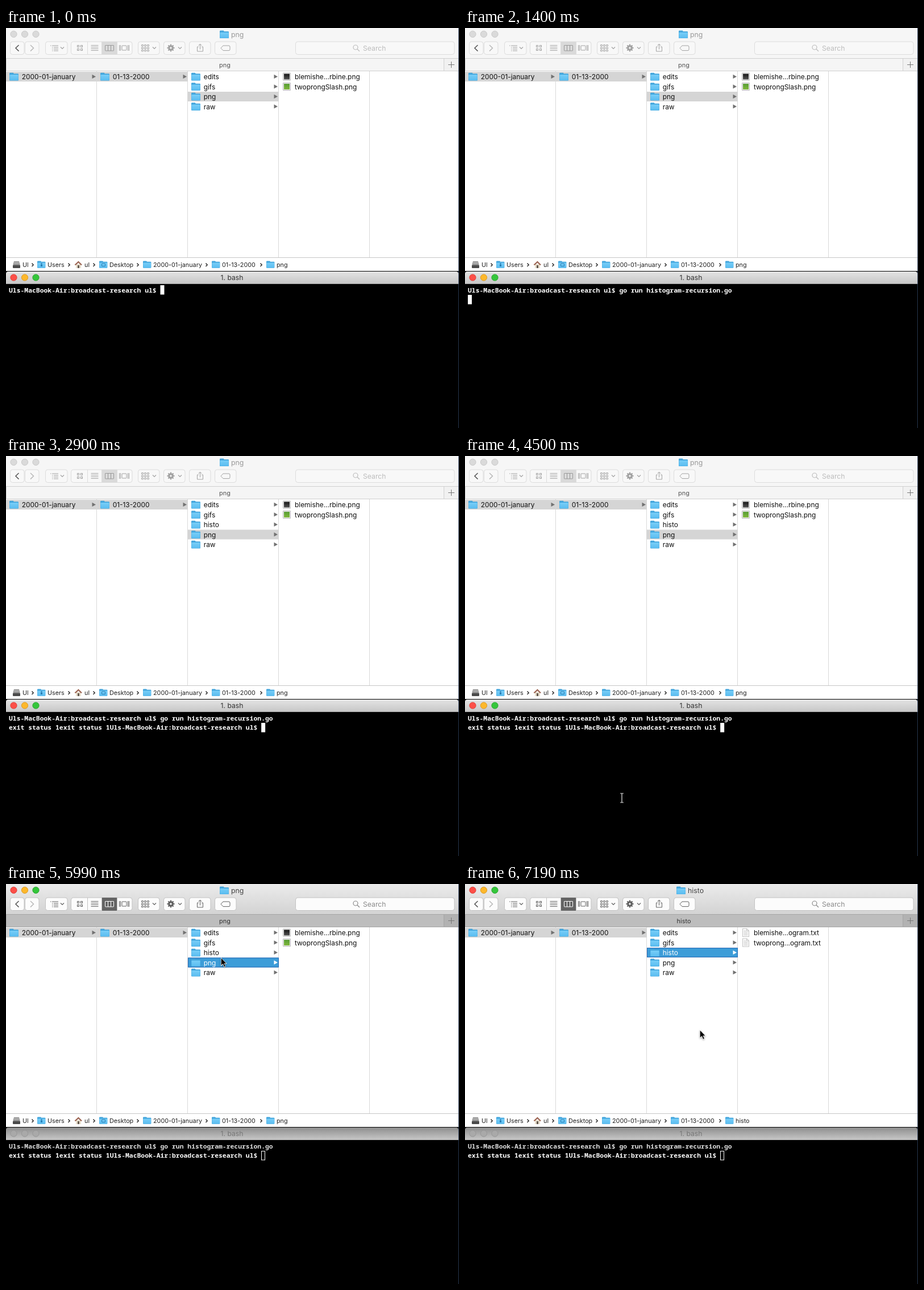
Write an HTML page with a canvas that moves like this. It is 797 by 703 pixels and loops after 7290 ms.

```html
<!DOCTYPE html>
<html lang="en">
<head>
<meta charset="utf-8">
<title>Terminal and file browser</title>
<style>
  html, body { margin: 0; width: 100%; height: 100%; overflow: hidden; background: #000; }
  canvas { display: block; }
</style>
</head>
<body>
<canvas id="stage" width="797" height="703"></canvas>
<script>
const ctx = document.getElementById('stage').getContext('2d');
const LOOP = 7290, ROW = 17.5, CELL = 6.833;
const PROMPT = 'Uls-MacBook-Air:broadcast-research ul$ ';
const COMMAND = 'go run histogram-recursion.go ';
const OUTPUT = 'exit status 1'.repeat(2) + PROMPT;

// Pointer stops: time, x, y
const POINTER = [
  [4500, 276, 601], [4600, 275, 500], [4700, 276, 380], [4790, 279, 307],
  [5090, 325, 254], [5190, 374, 199], [5290, 397, 168], [5390, 396, 140],
  [5490, 391, 112], [5590, 386, 94], [5690, 382, 104], [5790, 379, 119],
  [5990, 378, 129], [6090, 377, 125], [6190, 376, 120], [6290, 375, 115],
  [6390, 375, 113], [6890, 378, 130], [6990, 390, 182], [7090, 406, 235],
  [7190, 413, 256]
];

function box(x, y, w, h, fill) {
  ctx.fillStyle = fill;
  ctx.fillRect(x, y, w, h);
}

function round(x, y, w, h, r, fill, stroke) {
  ctx.beginPath();
  ctx.roundRect(x, y, w, h, r);
  if (fill) { ctx.fillStyle = fill; ctx.fill(); }
  if (stroke) { ctx.strokeStyle = stroke; ctx.lineWidth = 1; ctx.stroke(); }
}

function disc(x, y, r, fill, stroke) {
  ctx.beginPath();
  ctx.arc(x, y, r, 0, Math.PI * 2);
  if (fill) { ctx.fillStyle = fill; ctx.fill(); }
  if (stroke) { ctx.strokeStyle = stroke; ctx.stroke(); }
}

function line(points, color, width = 1) {
  ctx.beginPath();
  points.forEach(([x, y]) => ctx.lineTo(x, y));
  ctx.strokeStyle = color;
  ctx.lineWidth = width;
  ctx.stroke();
}

function shape(points, fill) {
  ctx.beginPath();
  points.forEach(([x, y]) => ctx.lineTo(x, y));
  ctx.closePath();
  ctx.fillStyle = fill;
  ctx.fill();
}

function fade(y0, y1, top, bottom) {
  const g = ctx.createLinearGradient(0, y0, 0, y1);
  g.addColorStop(0, top);
  g.addColorStop(1, bottom);
  return g;
}

function label(text, x, y, size = 11.9, color = '#111', align = 'left') {
  ctx.font = `${size}px Inter, sans-serif`;
  ctx.textAlign = align;
  ctx.fillStyle = color;
  ctx.fillText(text, x, y);
}

function folder(x, y, s = 1) {
  ctx.save();
  ctx.translate(x, y);
  ctx.scale(s, s);
  round(0, 0, 7.5, 6, 1.2, '#42a5dc');
  round(0, 1.4, 16, 12.2, 1.2, '#42a5dc');
  round(0.4, 3.2, 15.2, 10, 0.8, fade(3, 13, '#78cef8', '#5bbdf0'));
  ctx.restore();
}

function lights(y, active) {
  const colors = [['#fc4f48', '#df3c36'], ['#fdb82c', '#dc9a22'], ['#35c63b', '#27a52d']];
  const idle = y > 400 ? ['#a9a9a9', '#979797'] : ['#dadada', '#c9c9c9'];
  ctx.lineWidth = 1;
  [13.5, 33, 52.5].forEach((x, i) => disc(x, y, 5.6, ...(active ? colors[i] : idle)));
}

const chevron = (x, y, color) => line([[x - 3, y - 1.5], [x, y + 1.5], [x + 3, y - 1.5]], color, 1.2);

function toolbar(active) {
  const ink = active ? '#606060' : '#a2a2a2';
  const edge = active ? '#c2c2c2' : '#dcdcdc';
  const fill = active ? '#fcfcfc' : '#f8f8f8';
  [[7, 25], [33, 25], [69, 39], [114, 108], [232, 38], [277, 38], [322, 38], [367, 38], [509, 280]]
    .forEach(([x, w]) => round(x + .5, 24, w - .5, 22.5, 4, fill, edge));

  line([[22.5, 30], [17, 35.3], [22.5, 40.6]], '#555', 1.5);
  line([[43, 30], [48.5, 35.3], [43, 40.6]], '#b8b8b8', 1.5);

  [30.5, 33.5, 36.5, 39.5].forEach((y, i) => {
    const inset = i ? 3 : 0;
    box(78 + inset, y, 1.5, 1, ink);
    box(81 + inset, y, 11 - inset, 1, ink);
  });
  [99, 261, 306].forEach(x => chevron(x, 35, ink));

  box(169, 24, 26, 23, active ? '#646464' : '#dadada');
  [143, 168, 195].forEach(x => box(x, 24, 1, 23, edge));
  for (const x of [125, 131]) for (const y of [30.5, 36.5]) {
    ctx.strokeStyle = ink;
    ctx.lineWidth = 1;
    ctx.strokeRect(x + .5, y, 3, 3);
  }
  [30, 33, 36, 39].forEach(y => box(149.5, y, 13, 1, ink));
  const chosen = active ? '#fff' : '#999';
  round(174.5, 30.5, 15, 9.5, .5, null, chosen);
  [179.5, 184.5].forEach(x => line([[x, 30], [x, 40]], chosen));
  [199.5, 201.5, 214.5, 216.5].forEach(x => line([[x, 30], [x, 40]], ink));
  round(204, 31, 8, 8, .5, null, ink);

  for (let i = 0; i < 9; i++) {
    round(238.5 + i % 3 * 5, 29.5 + Math.floor(i / 3) * 4.5, 3, 2.5, .4, null, ink);
  }

  for (let i = 0; i < 8; i++) {
    const a = i * Math.PI / 4, c = Math.cos(a), s = Math.sin(a);
    line([[290 + c * 3, 35 + s * 3], [290 + c * 6.5, 35 + s * 6.5]], ink, 2.2);
  }
  disc(290, 35, 4.8, ink);
  disc(290, 35, 1.7, fill);

  line([[339, 33], [336.5, 33], [336.5, 41], [346.5, 41], [346.5, 33], [344, 33]], ink);
  line([[341.5, 37.5], [341.5, 28.5]], ink);
  line([[338.5, 31], [341.5, 28], [344.5, 31]], ink);

  ctx.beginPath();
  ctx.moveTo(378, 35.3);
  ctx.lineTo(382, 31);
  ctx.lineTo(392, 31);
  ctx.quadraticCurveTo(394, 31, 394, 33);
  ctx.lineTo(394, 37.6);
  ctx.quadraticCurveTo(394, 39.6, 392, 39.6);
  ctx.lineTo(382, 39.6);
  ctx.closePath();
  ctx.strokeStyle = ink;
  ctx.stroke();

  const hint = active ? '#8a8a8a' : '#bdbdbd';
  ctx.lineWidth = 1.2;
  disc(615, 34, 4, null, hint);
  line([[618, 37], [622, 41]], hint, 1.3);
  label('Search', 628, 39.8, 12.2, hint);
}

function row(x, y, name, state) {
  const blue = state === 'blue';
  if (state) box(x, y, x ? 160 : 159, 17, blue ? '#3c9cd8' : '#d5d5d5');
  if (blue) round(x + .5, y + .5, 159, 16, 0, null, '#2868b4');
  folder(x + 6, y + 1.8);
  label(name, x + 27.7, y + 13, 11.9, blue ? '#fff' : '#111');
  shape([[x + 151.5, y + 4.8], [x + 158, y + 8.4], [x + 151.5, y + 12]], blue ? '#fff' : '#727272');
}

function picture(y, green) {
  round(487.5, y + 2, 13, 13, .5, '#f4f4f4', '#b5b5b5');
  box(489, y + 3.5, 10, 10, green ? fade(y + 3, y + 14, '#559b35', '#82b83c') : fade(y + 3, y + 14, '#151515', '#555'));
}

function paper(y) {
  shape([[488, y + 1], [496, y + 1], [500, y + 5], [500, y + 16], [488, y + 16]], '#c4c4c4');
  shape([[489, y + 2], [495.5, y + 2], [499, y + 5.5], [499, y + 15], [489, y + 15]], '#fafafa');
  line([[495.5, y + 1.5], [495.5, y + 5.5], [499.5, y + 5.5]], '#c4c4c4');
  for (let i = 0; i < 4; i++) box(490.5, y + 5 + i * 2.4, i ? 7 : 4, 1, '#c9c9c9');
}

function columns(t, active, selected) {
  box(0, 76, 796, 328, '#fff');
  [159, 319, 479, 639].forEach(x => box(x, 76, 1, 328, '#d9d9d9'));
  row(0, 77, '2000-01-january', 'grey');
  row(160, 77, '01-13-2000', 'grey');

  const step = Math.floor((t - 1900) / 100) / 4;
  const gap = ROW * Math.max(0, Math.min(1, step)) ** 2;
  const state = name => name === selected ? (active ? 'blue' : 'grey') : '';
  row(320, 77, 'edits', '');
  row(320, 77 + ROW, 'gifs', '');
  if (gap) {
    ctx.save();
    ctx.beginPath();
    ctx.rect(320, 111, 160, gap + 1);
    ctx.clip();
    row(320, 77 + 2 * ROW, 'histo', state('histo'));
    ctx.restore();
  }
  row(320, 77 + 2 * ROW + gap, 'png', state('png'));
  row(320, 77 + 3 * ROW + gap, 'raw', '');

  const text = selected === 'histo';
  const files = text ? ['blemishe...ogram.txt', 'twoprong...ogram.txt'] : ['blemishe...rbine.png', 'twoprongSlash.png'];
  files.forEach((name, i) => {
    const y = 77 + i * ROW;
    text ? paper(y) : picture(y, i === 1);
    label(name, 508, y + 13);
  });
}

function pathBar(selected) {
  box(0, 403, 796, 1, '#c6c6c6');
  box(0, 404, 796, 23, '#fff');
  shape([[14, 410], [23, 410], [25, 418], [12, 418]], '#8b8b8b');
  round(12, 417, 13, 5, 1, '#4b4b4b');
  box(14, 411, 9, 4, '#aaa');

  [55, 164, 241, 362, 458].forEach(x => folder(x, 409.5, .9));
  disc(62.5, 414.5, 1.3, '#287eb4');
  box(61, 416, 3, 3, '#287eb4');
  round(168.5, 414, 6, 4.5, .5, null, '#287eb4');

  box(123, 415, 9, 7, '#e6ddcc');
  shape([[120.5, 416], [127.5, 409.5], [134, 416], [132, 417], [127.5, 412.5], [122.5, 417]], '#9b6250');
  box(126, 417, 3, 5, '#655a51');

  [[29, 'Ul'], [73, 'Users'], [138, 'ul'], [182, 'Desktop'], [259, '2000-01-january'], [380, '01-13-2000'], [476, selected]]
    .forEach(([x, name]) => label(name, x, 420, 10.8, '#222'));
  [47, 111, 155, 232, 353, 449].forEach(x => line([[x - 1.5, 413.5], [x + 1.2, 416.3], [x - 1.5, 419]], '#222', 1.4));
}

function browser(t, active, selected) {
  box(0, 0, 796, 53, active ? fade(0, 53, '#ebebeb', '#d3d3d3') : '#f6f6f6');
  lights(10.8, active);
  const left = selected === 'png' ? 376 : 372;
  folder(left, 4.5);
  label(selected, left + 20, 15.8, 12.3, active ? '#444' : '#999');
  toolbar(active);

  box(0, 53, 796, 23, active ? '#bdbdbd' : '#f5f5f5');
  const edge = active ? '#a5a5a5' : '#d0d0d0';
  box(0, 53, 796, 1, edge);
  box(0, 75, 796, 1, edge);
  box(0, 54, 1, 21, edge);
  box(770, 54, 26, 21, active ? '#b2b2b2' : '#f1f1f1');
  box(770, 54, 1, 21, edge);
  label(selected, 385, 69, 10.9, active ? '#333' : '#555', 'center');
  line([[778, 64.5], [789, 64.5]], '#777');
  line([[783.5, 59], [783.5, 70]], '#777');

  columns(t, active, selected);
  pathBar(selected);
}

function write(text, y, color) {
  ctx.font = '600 11.4px "Noto Sans Mono", monospace';
  ctx.textAlign = 'left';
  ctx.fillStyle = color;
  [...text].forEach((c, i) => ctx.fillText(c, 5 + i * CELL, y));
}

function terminal(t, active) {
  box(0, 427, 797, 276, '#000');
  round(0, 428, 796, 30, [4, 4, 0, 0], active ? fade(428, 450, '#e4e4e4', '#c6c6c6') : fade(428, 450, '#8e8e8e', '#c8c8c8'));
  box(0, 450, 796, 253, '#000');
  box(0, 449, 796, 1, active ? '#a5a5a5' : '#b5b5b5');
  lights(438.5, active);
  label('1. bash', 397.5, 443, 12.2, active ? '#333' : '#777', 'center');

  const typed = t < 300 ? 0 : t < 1090 ? Math.min(9, Math.floor((t - 300 + (t >= 690 ? 10 : 0)) / 100) + 2) : COMMAND.length;
  const first = PROMPT + COMMAND.slice(0, typed);
  const second = t >= 1900 ? OUTPUT : '';
  write(first, 464.8, active ? '#fff' : '#dedede');
  write(second, 481.3, '#fff');

  const below = t >= 1400;
  const x = 5 + CELL * (below ? second : first).length;
  const y = below ? 469 : 452;
  if (active) box(x, y, 7, 16.5, '#fff');
  else {
    ctx.strokeStyle = '#fff';
    ctx.lineWidth = 1;
    ctx.strokeRect(Math.round(x) + .5, y + .5, 6, 15.5);
  }
}

function pointer(t) {
  const stop = POINTER.filter(p => p[0] <= t).pop();
  if (!stop) return;
  const [, x, y] = stop;
  if (y > 450) {
    line([[x, y - 8], [x, y + 8]], '#ddd', 1.3);
    line([[x - 3, y - 8], [x + 3, y - 8]], '#ddd');
    line([[x - 3, y + 8], [x + 3, y + 8]], '#ddd');
    return;
  }
  ctx.save();
  ctx.translate(x, y);
  ctx.shadowColor = 'rgba(0,0,0,.4)';
  ctx.shadowBlur = 3;
  ctx.shadowOffsetY = 1;
  shape([[0, 0], [0, 15.5], [3.5, 12.4], [5.8, 17.5], [8.6, 16.3], [6.4, 11.4], [11, 11.2]], '#fff');
  ctx.shadowColor = 'transparent';
  shape([[.7, 1.6], [.7, 13.8], [3.8, 11], [6.1, 16.4], [7.8, 15.7], [5.5, 10.6], [9.4, 10.4]], '#000');
  ctx.restore();
}

function draw() {
  const t = performance.now() % LOOP;
  const browsing = t >= 5990;
  box(0, 0, 797, 703, '#27364f');
  terminal(t, !browsing);
  browser(t, browsing, t >= 6590 ? 'histo' : 'png');
  box(796, 0, 1, 703, '#27364f');
  pointer(t);
  requestAnimationFrame(draw);
}
draw();
</script>
</body>
</html>
```
